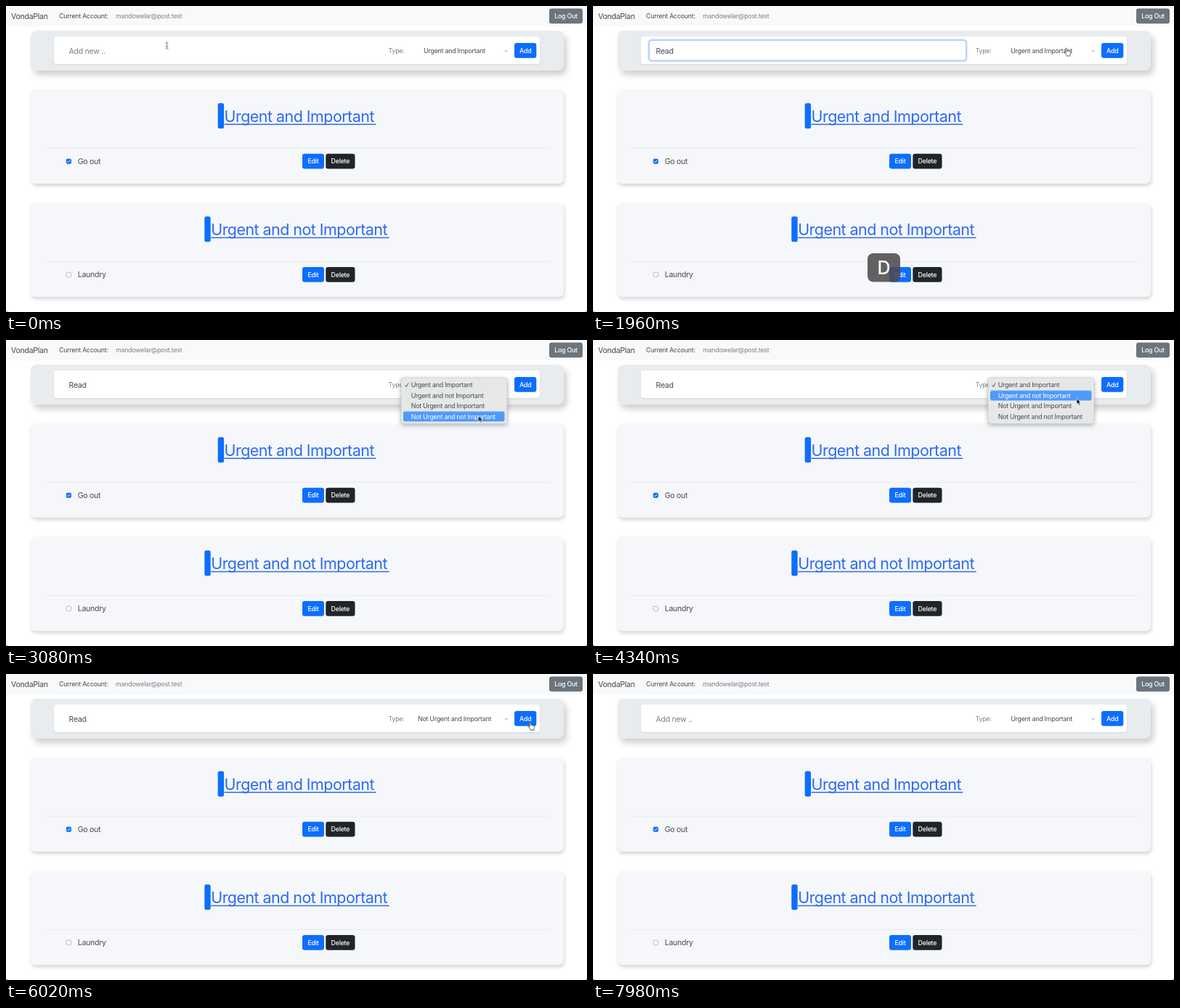
An HTML page for the animation above (8000 ms loop, 800 by 422 pixels).

```html
<!DOCTYPE html>
<html lang="en">
<head>
<meta charset="utf-8">
<title>Task list</title>
<style>
  html, body { margin: 0; width: 100%; height: 100%; overflow: hidden; background: #fff; }
  svg { display: block; width: 100vw; height: 100vh; }
  text {
    font-family: Inter, "Open Sans", sans-serif; font-size: 8.89px; font-optical-sizing: none;
    letter-spacing: -.028em; fill: #474b50; white-space: pre;
  }
  .body { font-size: 10.6px; }
  .mid { text-anchor: middle; }
  .muted { fill: #7b8086; }
  .btn text { fill: #fff; font-weight: 500; text-anchor: middle; }
  .title { font-size: 21.5px; letter-spacing: -.55px; fill: #2c6bf0; }
  .panel { fill: #e9ecef; filter: drop-shadow(4px 6px 4px rgba(0,0,0,.19)); }
  .card { fill: #f6f7fa; filter: drop-shadow(1px 3px 2.5px rgba(0,0,0,.17)); }
  .field { fill: #fff; filter: drop-shadow(0 1px 1px rgba(0,0,0,.08)); }
  .menu { fill: #e6e8e7; stroke: #c3c6c8; stroke-width: .6; filter: drop-shadow(0 2px 3px rgba(0,0,0,.28)); }
  .rule { stroke: #e4e6ea; stroke-width: .8; }
  #key text { font-size: 25px; font-weight: 500; letter-spacing: 0; fill: #fff; text-anchor: middle; }
</style>
</head>
<body>
<svg viewBox="0 0 800 422" preserveAspectRatio="none">
  <rect width="800" height="28.5" fill="#f8f9fa"/>
  <text class="body" x="7" y="18">VondaPlan</text>
  <text x="73" y="17.2">Current Account:</text>
  <text class="muted" x="151" y="17.2">mandowelar@post.test</text>

  <rect class="panel" x="34" y="34" width="734" height="55" rx="8"/>
  <rect class="field" x="66" y="42" width="669" height="38" rx="4"/>
  <g id="focus" fill="none">
    <rect x="76.5" y="46.5" width="438" height="29.5" rx="4.5" stroke="#c2dbfe" stroke-width="2"/>
    <rect x="77.5" y="47.5" width="436" height="27.5" rx="3.5" stroke="#86b7fe" stroke-width=".6"/>
  </g>
  <text id="placeholder" class="body muted" x="86.5" y="65.5">Add new ..</text>
  <text id="entry" class="body" x="86.5" y="65.5"></text>
  <text class="muted" x="526.5" y="65">Type:</text>
  <text id="first" class="mid" x="617.5" y="65">Urgent and Important</text>
  <text id="chosen" class="mid" x="617.5" y="65">Not Urgent and Important</text>
  <path d="M687 60.9l1.9 1.9 1.9-1.9" fill="none" stroke="#6b7076" stroke-width=".8"/>

  <g id="cards"></g>
  <g id="buttons"></g>

  <g id="menu">
    <rect class="menu" x="544" y="52" width="146" height="63.5" rx="4"/>
    <rect id="highlight" x="547" y="55.2" width="139.5" height="13.8" rx="2.5" fill="#4f99fb"/>
    <g id="rows"></g>
    <path id="tick" d="M549.5 62.4l1.6 2 3-5" fill="none" stroke="#474b50" stroke-width="1"/>
  </g>

  <g id="key">
    <rect x="378" y="341" width="45" height="39.5" rx="8" fill="#4b4b4c" fill-opacity=".87"/>
  </g>

  <g id="pointer">
    <path id="beam" d="M-2-4.5q2 0 2 1.5 0-1.5 2-1.5M0-3v6M-2 4.5q2 0 2-1.5 0 1.5 2 1.5M-1 1h2"
      fill="none" stroke="#555" stroke-width=".8"/>
    <path id="arrow" d="M0 0v8.2l1.9-1.7 1.3 2.9 1.5-.7-1.3-2.8h2.5z" fill="#111" stroke="#fff" stroke-width=".7"/>
    <path id="hand" d="M-1 .2Q0-.8 .9.2L1.4 3.6Q2.6 2.8 3.2 3.9 4.4 3.2 4.9 4.3 6.4 4 6.3 5.6L5.6 8.5V10.3H.8V9.2L-2.1 6Q-2.4 4.8-1.2 5L-.3 5.8z"
      fill="#fff" stroke="#333" stroke-width=".8" stroke-linejoin="round"/>
  </g>

  <path d="M0 418.5Q0 422 3.5 422H0zM800 418.5Q800 422 796.5 422H800z" fill="#8a8a8a"/>
</svg>
<script>
const LOOP = 8000;
const $ = id => document.getElementById(id);
const add = (parent, markup) => {
  parent.insertAdjacentHTML("beforeend", markup);
  return parent.lastElementChild;
};

// Static parts
const card = (y, title, barX, task, done) => add($("cards"), `<g transform="translate(0 ${y})">
  <rect class="card" x="34" width="734" height="130" rx="7"/>
  <rect x="${barX}" y="19" width="8.4" height="35" rx="2.5" fill="#0d6efd"/>
  <text class="title" x="${barX + 8.9}" y="44.7">${title}</text>
  <path d="M${barX + 8.9} 48.2H${801 - barX}" stroke="#2c6bf0" stroke-width="1.5"/>
  <path class="rule" d="M53 81H750"/>
  <rect x="83.2" y="96" width="6.4" height="6.4" rx="1.4" stroke-width=".7"
    fill="${done ? "#0d6efd" : "#fff"}" stroke="${done ? "#0d6efd" : "#9b9fa4"}"/>
  ${done ? '<path d="M84.6 99.3l1.3 1.4 2.3-3" fill="none" stroke="#fff" stroke-width="1"/>' : ""}
  <text class="body" x="98.7" y="102.8">${task}</text></g>`);

const button = (x, y, width, fill, label) => add($("buttons"), `<g class="btn">
  <rect x="${x}" y="${y}" width="${width}" height="20.8" rx="3.3" fill="${fill}"/>
  <text x="${x + width / 2}" y="${y + 13.6}">${label}</text></g>`);

card(115, "Urgent and Important", 291.7, "Go out", true);
card(271.3, "Urgent and not Important", 273.3, "Laundry", false);
for (const y of [203.7, 360]) {
  button(408, y, 30, "#0d6efd", "Edit");
  button(440.3, y, 40.2, "#212529", "Delete");
}
button(748, 3.4, 46, "#6c757d", "Log Out");
const addButton = button(700, 51, 30.3, "#0d6efd", "Add").firstElementChild;

// Each step is [time, value]; it holds or eases until the next step.
const play = (el, prop, steps, easing = "step-end") => {
  const frames = steps.map(([at, value]) => ({ offset: at / LOOP, [prop]: value, easing }));
  frames.push({ offset: 1, [prop]: steps.at(-1)[1] });
  el.animate(frames, { duration: LOOP, iterations: Infinity }).startTime = 0;
};
const show = (el, ...spans) => {
  const steps = spans.flatMap(([from, to]) => [[from, 1], [to, 0]]).filter(([at]) => at < LOOP);
  if (steps[0][0] > 0) steps.unshift([0, 0]);
  play(el, "opacity", steps);
};

const OPEN = 2170, CLOSE = 5080, CLEAR = 7000, RESET = 7500;

// Typing, with the pressed key shown below
const typed = [["R", 700], ["e", 920], ["a", 1140], ["d", 1380]];
typed.forEach(([letter, at], i) => {
  const span = document.createElementNS("http://www.w3.org/2000/svg", "tspan");
  span.textContent = letter;
  $("entry").append(span);
  play(span, "fillOpacity", [[0, 0], [at, 1], [CLEAR, 0]]);
  const cap = add($("key"), `<text x="400.5" y="370">${letter.toUpperCase()}</text>`);
  show(cap, [at, typed[i + 1]?.[1] ?? 2600]);
});
play($("key"), "opacity", [[0, 0], [699, 0], [700, 1], [2050, 1], [2400, 0]], "linear");

show($("focus"), [350, OPEN]);
show($("placeholder"), [0, 700], [RESET, LOOP]);
show($("first"), [0, CLOSE], [RESET, LOOP]);
show($("chosen"), [CLOSE, RESET]);
play(addButton, "fill", [[0, "#0d6efd"], [6020, "#0d6efd"], [6170, "#0b5ed7"],
  [RESET, "#0b5ed7"], [RESET + 100, "#0d6efd"]], "linear");

// Drop-down list
const ROW = 14.45;
const hover = [[0, 0], [2560, 1], [2680, 2], [2800, 3], [3700, 2], [4020, 1], [4560, 2]];
["Urgent and Important", "Urgent and not Important", "Not Urgent and Important", "Not Urgent and not Important"]
  .forEach((label, i) => {
    const row = add($("rows"), `<text x="557.7" y="${65.2 + i * ROW}">${label}</text>`);
    play(row, "fill", hover.map(([at, n]) => [at, n === i ? "#fff" : "#474b50"]));
  });
play($("highlight"), "transform", hover.map(([at, n]) => [at, `translateY(${n * ROW}px)`]));
play($("tick"), "stroke", hover.map(([at, n]) => [at, n ? "#474b50" : "#fff"]));
show($("menu"), [OPEN, CLOSE]);

// Mouse pointer
const path = [
  [0, 221.5, 54.5], [1600, 221.5, 54.5], [1900, 651.5, 58.5], [2450, 651.5, 61], [2850, 650.5, 104.5],
  [3500, 650.5, 104.5], [4100, 666, 80.5], [4400, 666, 80.5], [4650, 664, 91], [5150, 664, 91],
  [5800, 721.5, 67], [6950, 721.5, 67], [7350, 636, 69], [7650, 271, 383]
];
play($("pointer"), "transform", path.map(([at, x, y]) => [at, `translate(${x}px, ${y}px)`]), "ease-in-out");
show($("beam"), [0, 700], [1600, 1810]);
show($("hand"), [1810, OPEN], [CLOSE, 7430]);
show($("arrow"), [OPEN, CLOSE], [7430, 7650]);
</script>
</body>
</html>
```
